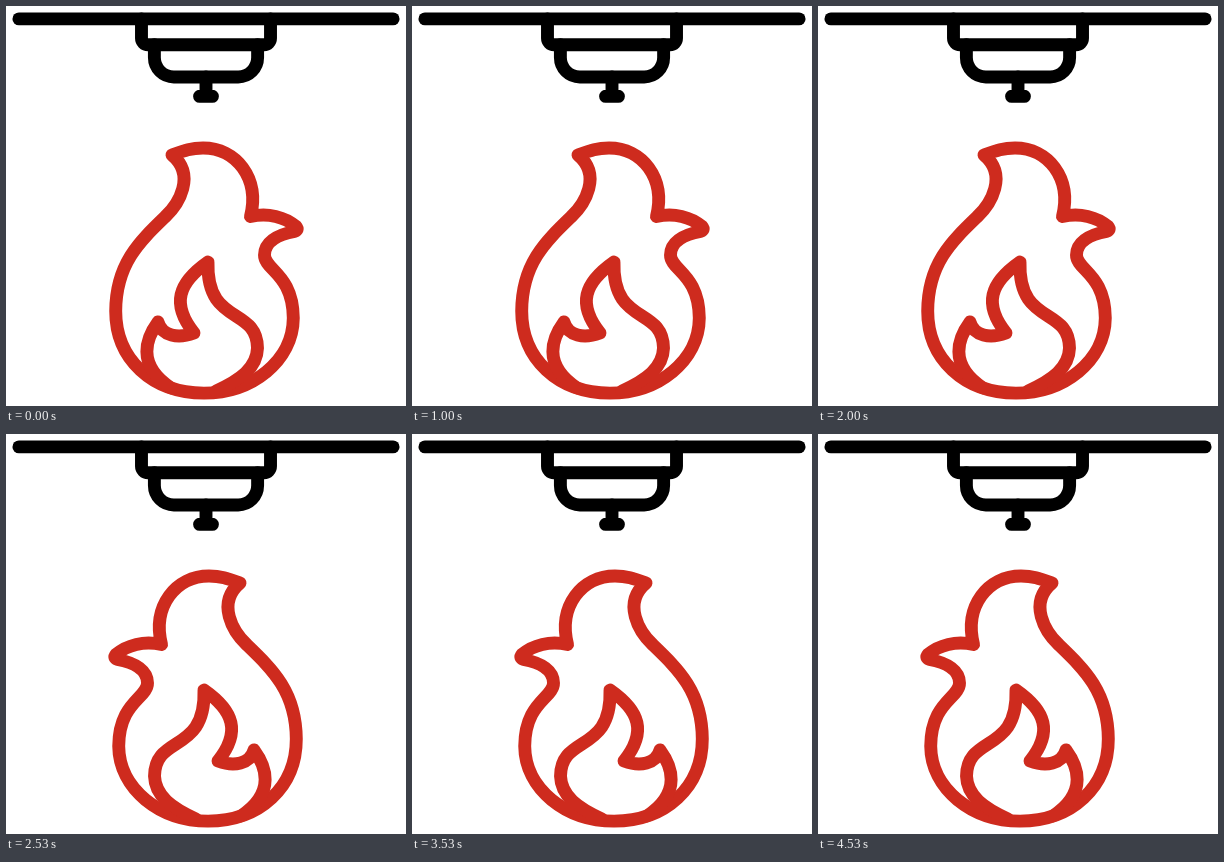
These frames come from a looping animation (400x400 px, 5 s). An HTML page:

```html
<!DOCTYPE html>
<html lang="en">
<head>
<meta charset="utf-8">
<title>Smoke detector</title>
<style>
  html, body { margin: 0; width: 100%; height: 100%; overflow: hidden; background: #fff; }
  svg { display: block; width: 100%; height: 100%; }
  path { fill: none; stroke-linecap: round; stroke-linejoin: round; }
  .detector { stroke: #000; stroke-width: 2; }
  .flame { stroke: #ce2b1e; stroke-width: 12.9; transform-origin: 200px 0; }
</style>
</head>
<body>
<svg viewBox="0 0 400 400">
  <!-- The detector sits on a 62-unit grid. -->
  <g class="detector" transform="scale(6.4516)">
    <path d="M2 2H60"/>
    <path d="M21 2V5A1 1 0 0 0 22 6H40A1 1 0 0 0 41 5V2"/>
    <path d="M23 6V8A3 3 0 0 0 26 11H36A3 3 0 0 0 39 8V6"/>
    <path d="M31 11V14M30 14H32"/>
  </g>
  <g class="flame">
    <path d="M166 149C177 145 184 142 197 142C230 142 254 172 244.500 210.500
      C262 206.500 279 211 290 220.500Q293 224 288.500 225.500
      C270 229 258.500 237 258.500 249C258.500 264 287 268 287.300 312
      C287 355 246 387.100 198 387.100
      C146 387.100 109.700 353 109.700 305C110 258 133 236 159 211
      C173 198 190 169 166 149Z"/>
    <path d="M165 382C129 358 141 331 152 316C156 330 172 333 188 327
      C165 298 172 277 202 256C200 320 251 300 251.500 342C251 362 234 374 210 385"/>
  </g>
</svg>
<script>
  // The flame flips sideways twice per second, with a hard change.
  const mirrored = "scaleX(-1)";
  document.querySelector(".flame").animate([
    { offset: 0, transform: "none", easing: "step-end" },
    { offset: 0.53, transform: mirrored, easing: "step-end" },
    { offset: 1, transform: mirrored }
  ], { duration: 1000, iterations: Infinity });
</script>
</body>
</html>
```
